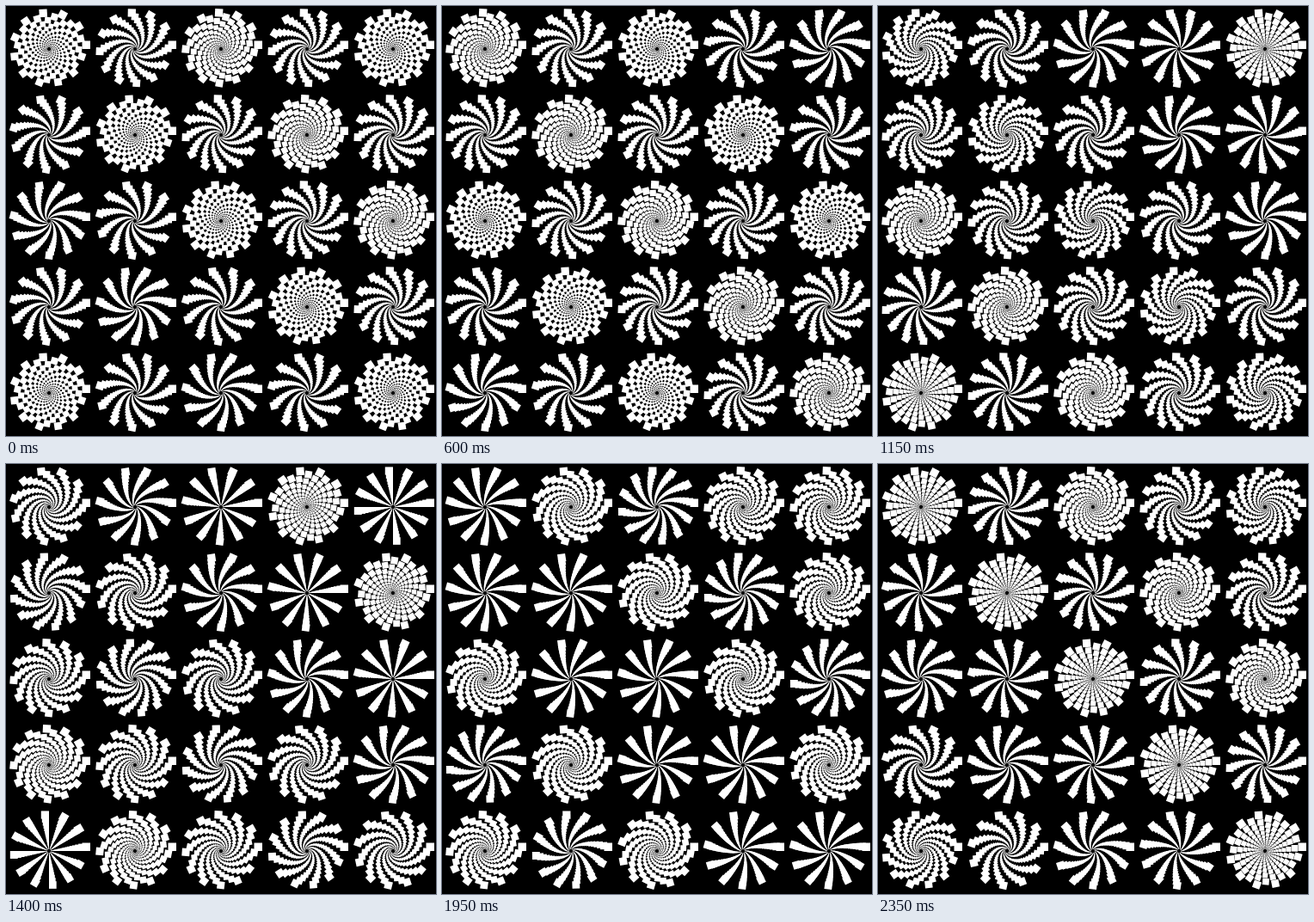
Recreate the animation shown at these times as an HTML page with a canvas. Size 500 px wide and 500 px high, loop 2400 ms.

```html
<!DOCTYPE html>
<html lang="en">
<head>
<meta charset="utf-8">
<title>Spiral grid</title>
<style>
  html, body { margin: 0; width: 100%; height: 100%; overflow: hidden; background: #000; }
  canvas { display: block; width: 500px; height: 500px; }
</style>
</head>
<body>
<canvas id="stage" width="500" height="500"></canvas>
<script>
  const ctx = document.getElementById('stage').getContext('2d');
  const LOOP = 2400, STEP = 50;
  const GRID = 5, CELL = 100;
  const COUNT = 300, SHRINK = 0.99;
  const OUTER = 48, SIDE = 9.5;
  const RAD = Math.PI / 180;

  // One chain of squares, each turned by `turn` and shrunk from the one before.
  function drawSpiral(cx, cy, turn) {
    let scale = 1;
    for (let i = 0; i < COUNT; i++) {
      const c = scale * Math.cos(i * turn);
      const s = scale * Math.sin(i * turn);
      ctx.setTransform(c, -s, s, c, cx, cy);
      ctx.fillRect(OUTER - SIDE, -SIDE, SIDE, SIDE);
      scale *= SHRINK;
    }
  }

  function draw(time) {
    ctx.setTransform(1, 0, 0, 1, 0, 0);
    ctx.fillStyle = '#000';
    ctx.fillRect(0, 0, GRID * CELL, GRID * CELL);
    ctx.fillStyle = '#fff';
    const phase = 2 * Math.PI * time / LOOP;
    for (let row = 0; row < GRID; row++) {
      for (let col = 0; col < GRID; col++) {
        const turn = 31 - 2 * Math.sin(phase + (col - row) * Math.PI / 4);
        drawSpiral((col + 0.5) * CELL, (row + 0.5) * CELL, turn * RAD);
      }
    }
  }

  const start = performance.now();
  let shown = -1;
  function tick() {
    const elapsed = Math.max(0, performance.now() - start) % LOOP;
    const step = Math.floor(elapsed / STEP);
    if (step !== shown) {
      shown = step;
      draw(step * STEP);
    }
    requestAnimationFrame(tick);
  }
  tick();
</script>
</body>
</html>
```
